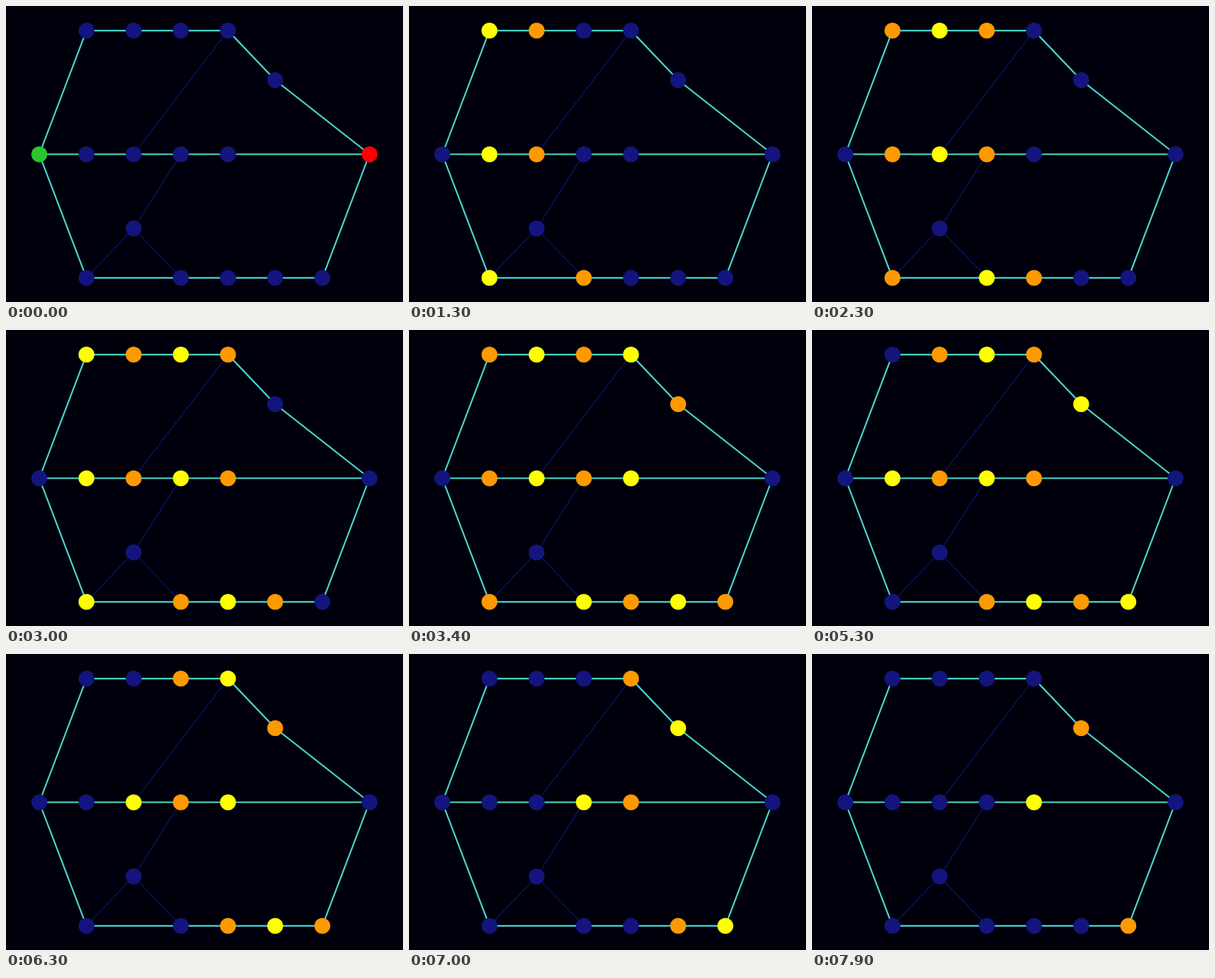
Write an HTML page with a canvas that moves like this. It is 600x448 px and loops after 8000 ms.

```html
<!DOCTYPE html>
<html lang="en">
<head>
<meta charset="utf-8">
<title>Ants crossing a graph</title>
<style>
  html, body { margin: 0; width: 100%; height: 100%; overflow: hidden; background: #00000c; }
  canvas { display: block; }
</style>
</head>
<body>
<canvas id="stage" width="600" height="448"></canvas>
<script>
const ctx = document.getElementById('stage').getContext('2d');

const LOOP = 8000;
const IDLE = '#14147f';
const ANTS = ['#ff9900', '#ffff00'];

// Grid coordinates of the rooms
const START = [0, 5], END = [7, 5], SIDE = [2, 8];
const routes = [
  { ants: 5, rooms: [[1, 0], [2, 0], [3, 0], [4, 0], [5, 2]] },
  { ants: 6, rooms: [[1, 5], [2, 5], [3, 5], [4, 5]] },
  { ants: 5, rooms: [[1, 10], [3, 10], [4, 10], [5, 10], [6, 10]] }
];
const sideTunnels = [
  [[4, 0], [2, 5]],
  [[3, 5], SIDE, [1, 10]],
  [SIDE, [3, 10]]
];

// Moments at which every ant steps one room forward
const turnTimes = [700, 1000, 1400, 2400, 3400, 4400, 5400, 6400, 7400];

const place = ([x, y]) => [50.3 + x * 71.3, 37.3 + y * 37.42];

function path(points, color, width) {
  ctx.beginPath();
  points.forEach(p => ctx.lineTo(...place(p)));
  ctx.strokeStyle = color;
  ctx.lineWidth = width;
  ctx.stroke();
}

function room(point, color) {
  ctx.beginPath();
  ctx.arc(...place(point), 12, 0, Math.PI * 2);
  ctx.fillStyle = color;
  ctx.fill();
}

function draw(time) {
  const turn = turnTimes.filter(t => t <= time).length;

  ctx.fillStyle = '#00000c';
  ctx.fillRect(0, 0, 600, 448);

  sideTunnels.forEach(t => path(t, '#13136e', 1.25));
  routes.forEach(r => path([START, ...r.rooms, END], '#48d1cc', 2.4));

  room(START, turn ? IDLE : '#2dc52d');
  room(END, turn ? IDLE : '#ff0000');
  room(SIDE, IDLE);

  for (const { ants, rooms } of routes) {
    rooms.forEach((point, i) => {
      const ant = turn - i - 1;
      room(point, ant >= 0 && ant < ants ? ANTS[ant % 2] : IDLE);
    });
  }
}

const begin = performance.now();
function tick() {
  draw((performance.now() - begin) % LOOP);
  requestAnimationFrame(tick);
}
tick();
</script>
</body>
</html>
```
